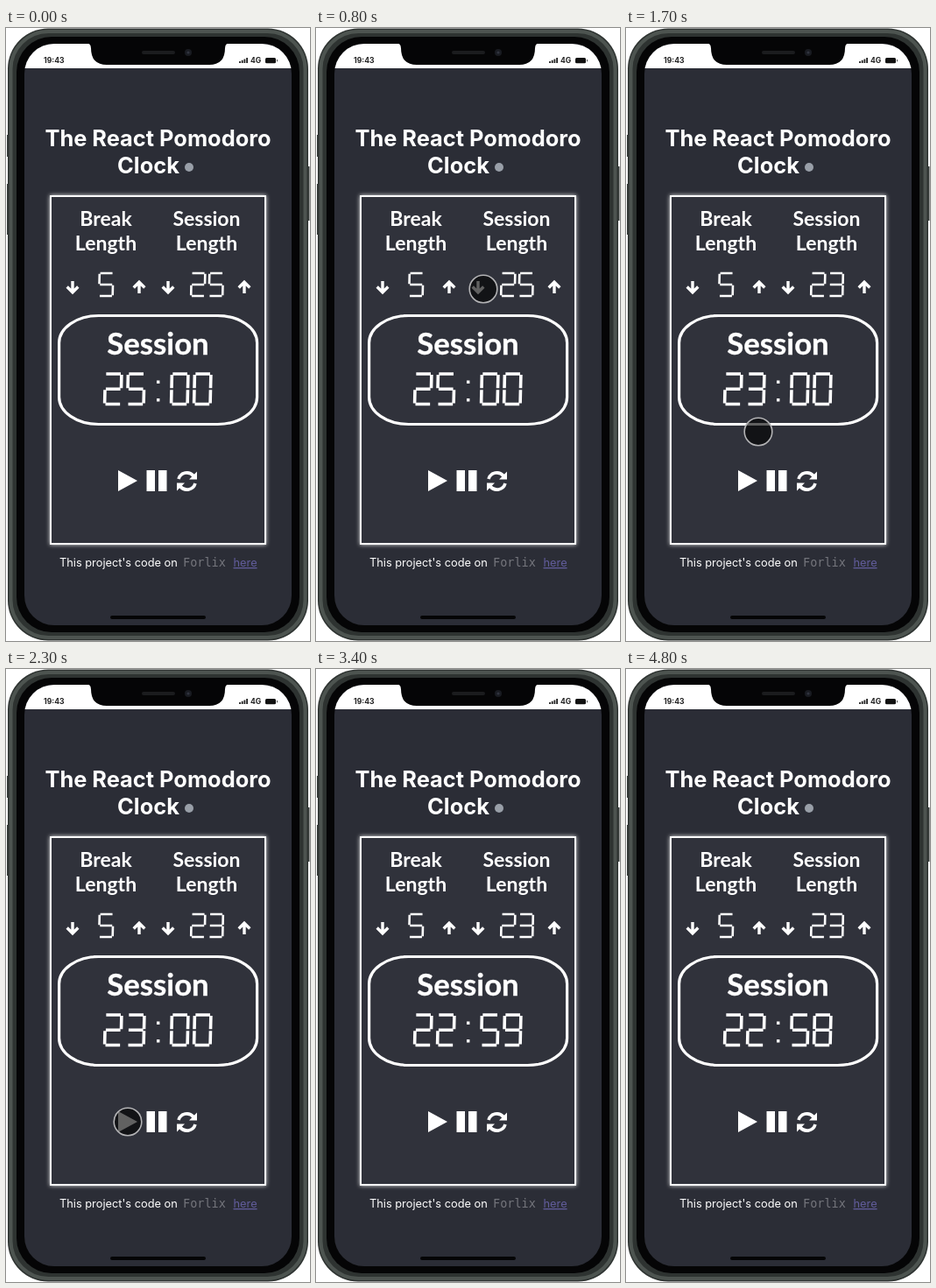
An HTML page that plays this animation: 347x700 px, repeating every 4900 ms.

```html
<!DOCTYPE html>
<html lang="en">
<head>
<meta charset="utf-8">
<title>Pomodoro clock</title>
<style>
html, body { margin: 0; width: 100%; height: 100%; overflow: hidden; background: #fff; }
svg { display: block; font-family: Inter, sans-serif; }
text { fill: #fff; }
.title { font-size: 25.4px; font-weight: 700; }
.label { font-family: Lato, sans-serif; font-weight: 700; text-anchor: middle; }
.status text { font-size: 8.6px; font-weight: 700; fill: #222; }
.foot { font-size: 12.8px; }
.glow { filter: drop-shadow(0 0 2.5px #fffd); }
.line { fill: none; stroke: #fff; }
</style>
</head>
<body>
<svg width="347" height="700" viewBox="0 0 347 700">
  <defs>
    <clipPath id="screen"><rect x="21" y="18" width="305" height="664" rx="34"/></clipPath>
    <path id="arrow" class="line" stroke-width="3.4" d="M0-7V5M-6.3-.5L0 5.8L6.3-.5"/>
    <g id="turn">
      <path class="line" stroke-width="3.6" d="M-9.5-2.5A9.8 9.8 0 0 1 7.5-6"/>
      <path fill="#fff" d="M11.5-11V-2H2.5Z"/>
    </g>
  </defs>

  <!-- phone body -->
  <path stroke="#3a3f3c" stroke-width="2" d="M2 122v25M2 178v58M345.5 158v62"/>
  <rect x="2" y=".5" width="343" height="699" rx="46" fill="#2e3331"/>
  <rect x="5.5" y="4" width="336" height="692" rx="43" fill="none" stroke="#4d5450" stroke-width="4"/>
  <rect x="12" y="10" width="323" height="680" rx="40" fill="#050506"/>

  <g clip-path="url(#screen)">
    <path fill="#2b2d36" d="M21 18h305v664h-305z"/>
    <path fill="#fff" d="M21 18h305v28h-305z"/>
    <path fill="#050506" d="M91 17q6 0 6 6q0 19 18 19h117q18 0 18-19q0-6 6-6z"/>
  </g>
  <path stroke="#1b1c1e" stroke-width="4" stroke-linecap="round" d="M157 28h34"/>
  <circle cx="208" cy="28" r="4" fill="#191b21"/>
  <circle cx="208" cy="28" r="1.6" fill="#30343f"/>
  <path stroke="#050506" stroke-width="4" stroke-linecap="round" d="M121 673h105"/>

  <g class="status">
    <text x="43" y="40">19:43</text>
    <text x="279" y="40">4G</text>
    <path stroke="#222" stroke-width="1.8" d="M267 40v-2M269.7 40v-3.2M272.4 40v-4.6M275.1 40v-6"/>
    <rect x="296" y="34" width="12" height="6.3" rx="1.5" fill="#111"/>
    <path stroke="#555" d="M309.5 36v2.4"/>
  </g>

  <text class="title" x="173.5" y="135" text-anchor="middle">The React Pomodoro</text>
  <text class="title" x="127" y="166">Clock</text>
  <circle cx="209" cy="159" r="5" fill="#999fa8"/>

  <rect class="glow" x="51" y="192" width="245" height="397" fill="#30323b" stroke="#fff" stroke-width="2"/>
  <g class="label" font-size="23">
    <text x="114" y="226">Break</text><text x="114" y="254">Length</text>
    <text x="229" y="226">Session</text><text x="229" y="254">Length</text>
  </g>
  <use href="#arrow" x="76" y="296"/>
  <use href="#arrow" transform="translate(152 296) scale(1 -1)"/>
  <use href="#arrow" x="185" y="296"/>
  <use href="#arrow" transform="translate(272 296) scale(1 -1)"/>

  <rect class="line" x="60.6" y="328.5" width="226" height="124" rx="45" ry="31" stroke-width="3.2"/>
  <text class="label" x="173.5" y="373" font-size="34.7" stroke="#fff" stroke-width=".4">Session</text>
  <path id="small" class="line" stroke-width="2.6"/>
  <path id="large" class="line" stroke-width="3.6"/>
  <path fill="#fff" d="M172 402.5h3.4v3.4h-3.4zM172 423h3.4v3.4h-3.4z"/>

  <path fill="#fff" d="M128 505v24l22-12zM160.5 505h9.5v24h-9.5zM174 505h9.5v24h-9.5z"/>
  <g transform="translate(206.5 517.5)"><use href="#turn"/><use href="#turn" transform="rotate(180)"/></g>

  <text class="foot" x="61" y="615">This project's code on</text>
  <text x="202" y="615" style="font:13.5px 'DejaVu Sans Mono',monospace;fill:#74757c">Forlix</text>
  <text class="foot" x="259.5" y="615" style="fill:#625d9c;text-decoration:underline">here</text>

  <circle id="touch" r="15.8" fill="#000" fill-opacity=".62" stroke="#b4b4b6" stroke-width="1.6"/>
</svg>
<script>
const LOOP = 4900, STEP = 100;
const [small, large, touch] = ['small', 'large', 'touch'].map(id => document.getElementById(id));

// Segments a to g as unit lines: x from 0 to 1, y from 0 to 2.
const SEGMENTS = {
  a: [0, 0, 1, 0], b: [1, 0, 1, 1], c: [1, 1, 1, 2], d: [0, 2, 1, 2],
  e: [0, 1, 0, 2], f: [0, 0, 0, 1], g: [0, 1, 1, 1]
};
const SHAPES = ['abcdef', 'bc', 'abged', 'abgcd', 'fgbc', 'afgcd', 'afgedc', 'abc', 'abcdefg', 'abcdfg'];

// Time, x and y of the touch point.
const PATH = [
  [200, 291, 345], [500, 229, 290], [600, 206, 293], [700, 191, 298], [1500, 191, 298],
  [1700, 151, 461], [1900, 139, 517], [2400, 139, 517]
];

function digit(n, x, y, w, h) {
  const px = (u, v) => x + u * w + (1 - v) * h * .012;
  const py = v => y + v * h / 2;
  return [...SHAPES[n]].map(s => {
    const [x1, y1, x2, y2] = SEGMENTS[s];
    const gx = (x2 - x1) * .05, gy = (y2 - y1) * .06;
    return `M${px(x1 + gx, y1 + gy)} ${py(y1 + gy)}L${px(x2 - gx, y2 - gy)} ${py(y2 - gy)}`;
  }).join('');
}

function number(n, xs, y, w, h) {
  const text = String(n).padStart(xs.length, '0');
  return xs.map((x, i) => digit(+text[i], x, y, w, h)).join('');
}

function touchAt(t) {
  const i = PATH.findIndex(p => p[0] >= t);
  if (i < 0 || t < PATH[0][0]) return null;
  const [t2, x2, y2] = PATH[i], [t1, x1, y1] = PATH[Math.max(0, i - 1)];
  const k = t2 > t1 ? (t - t1) / (t2 - t1) : 0;
  return [x1 + (x2 - x1) * k, y1 + (y2 - y1) * k];
}

function draw(t) {
  const length = t < 1300 ? 25 : t < 1500 ? 24 : 23;
  const elapsed = Math.max(0, Math.floor((t - 2400) / 1000));
  const left = length * 60 - elapsed;
  small.setAttribute('d',
    number(5, [106.5], 280, 15.5, 26) +
    number(length, [211.5, 232], 280, 15.5, 26));
  large.setAttribute('d',
    number(Math.floor(left / 60), [113, 139], 395, 18.5, 34.5) +
    number(left % 60, [189, 215], 395, 18.5, 34.5));

  const spot = touchAt(t);
  touch.style.display = spot ? '' : 'none';
  if (spot) touch.setAttribute('transform', `translate(${spot})`);
}

function tick() {
  draw(Math.floor(performance.now() % LOOP / STEP) * STEP);
  requestAnimationFrame(tick);
}
tick();
</script>
</body>
</html>
```
